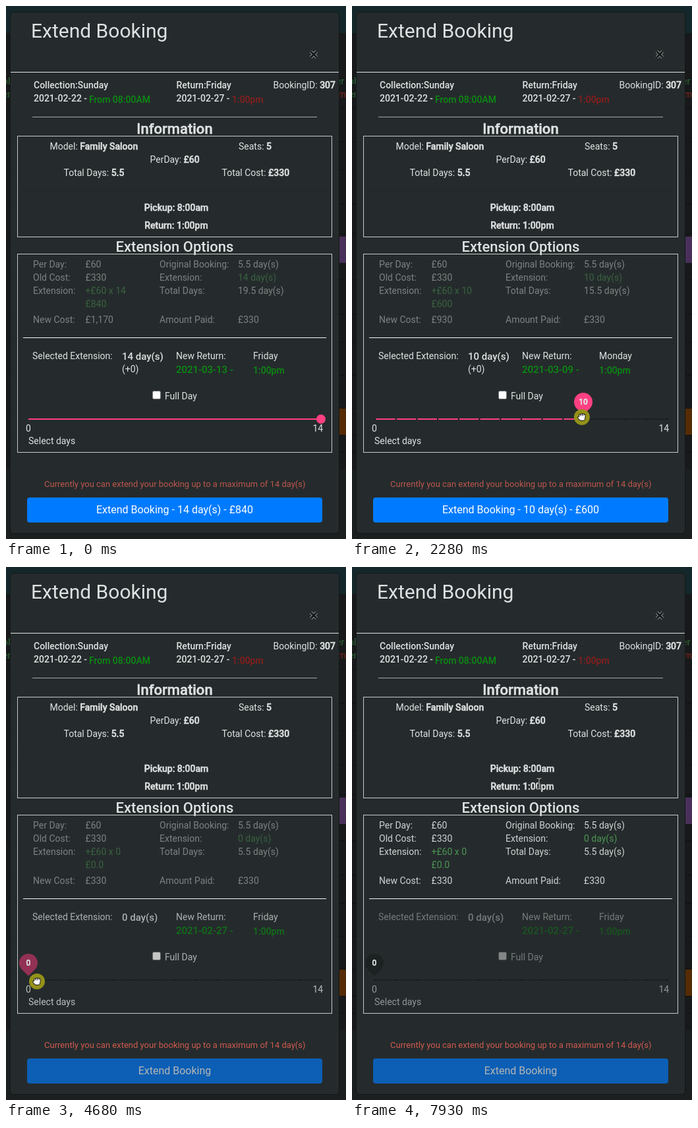
Animation of 516x809 px, one loop 8 s. Source, as an HTML page:

```html
<!DOCTYPE html>
<html lang="en">
<head>
<meta charset="utf-8">
<title>Extend Booking</title>
<style>
  html, body { margin: 0; width: 100%; height: 100%; overflow: hidden; background: #1a1d1e; }
  svg { display: block; width: 516px; height: 809px; font: 14px Roboto, Arial, sans-serif; fill: #dfe1e2; }
  text { white-space: pre; }
  .m { font-weight: 500; }
  .b { font-weight: 500; stroke: #dfe1e2; stroke-width: .5px; }
  .go { fill: #0a8c12; font-weight: 500; }
  .plus { fill: #4f9e57; }
  .mid { text-anchor: middle; }
  .frame { fill: none; stroke: #c6c9c9; }
</style>
</head>
<body>
<svg id="stage" viewBox="0 0 516 809"></svg>
<script>
const LOOP = 8000, PINK = [255, 64, 129], DARK = [28, 33, 34];
const SLIDER = { x: 34, y: 627, step: 31.7, max: 14 };
const WEEK = ['Friday', 'Saturday', 'Sunday', 'Monday', 'Tuesday', 'Wednesday', 'Thursday'];

const text = (x, y, body, cls = '', extra = '') =>
  `<text x="${x}" y="${y}" class="${cls}" ${extra}>${body}</text>`;
const live = (x, y, id, cls = '', extra = '') => text(x, y, '', cls, `id="${id}" ${extra}`);
const rect = (x, y, w, h, fill, extra = '') =>
  `<rect x="${x}" y="${y}" width="${w}" height="${h}" fill="${fill}" ${extra}/>`;
const bold = s => `<tspan class="b">${s}</tspan>`;

const backdrop = () => rect(0, 0, 516, 809, '#17191a') + rect(0, 0, 516, 41, '#14272a') +
  rect(0, 703, 516, 106, '#1b1f20') +
  [155, 206, 248, 300, 345, 415, 467, 510, 560, 610, 651, 677].map(y => rect(0, y, 516, 1, '#0e1011')).join('') +
  rect(500, 350, 20, 40, '#49305a', 'rx="3"') + rect(500, 611, 20, 40, '#552c05') +
  text(-5, 119, 'ol', 'm', 'style="fill:#285a33"') + text(-5, 139, 'er', 'm', 'style="fill:#285a33"') +
  text(501, 119, 'er', 'm', 'style="fill:#285a33"') + text(504, 139, 'm', 'm', 'style="fill:#6b241c"');

const header = () => rect(6.5, 9.5, 499, 791, '#252b2c', 'rx="5" stroke="#141718"') +
  text(38, 48, 'Extend Booking', '', 'font-size="30"') +
  `<path d="M462.5 69l9 9m0-9l-9 9" stroke="#8b8f90" stroke-width="4.6"/>
   <path d="M462.5 69l9 9m0-9l-9 9" stroke="#141718" stroke-width="2.6"/>` +
  rect(7, 100, 498, 1, '#dfe1e2') +
  text(42, 125, 'Collection:Sunday', 'm') + text(42, 145, '2021-02-22 -', 'm') +
  text(126, 147, 'From 08:00AM', 'go') +
  text(258.5, 125, 'Return:Friday', 'm') + text(258.5, 145, '2021-02-27 -', 'm') +
  text(343, 147, '1:00pm', 'm', 'style="fill:#8c1d1d"') +
  text(405.5, 125, 'BookingID: ' + bold('307')) +
  rect(40, 168, 432, 1, '#a3a6a6');

const info = () => text(256, 194, 'Information', 'b mid', 'font-size="22"') +
  rect(17.5, 197.5, 477, 153, 'none', 'class="frame"') +
  text(66.5, 218, 'Model: ' + bold('Family Saloon')) + text(353, 218, 'Seats: ' + bold('5')) +
  text(218.5, 238, 'PerDay: ' + bold('£60')) +
  text(87.5, 258, 'Total Days: ' + bold('5.5')) + text(327.5, 258, 'Total Cost: ' + bold('£330')) +
  rect(26, 280, 460, 1, '#212627') +
  text(258.5, 311, 'Pickup: 8:00am', 'b mid') + text(258.5, 338, 'Return: 1:00pm', 'b mid');

const costs = () => '<g id="costs">' +
  ['Per Day:', 'Old Cost:', 'Extension:'].map((s, i) => text(41, 397 + 20 * i, s)).join('') +
  ['Original Booking:', 'Extension:', 'Total Days:'].map((s, i) => text(233, 397 + 20 * i, s)).join('') +
  text(41, 481, 'New Cost:') + text(233, 481, 'Amount Paid:') +
  text(120.5, 397, '£60') + text(120.5, 417, '£330') + text(352, 397, '5.5 day(s)') + text(352, 481, '£330') +
  live(120.5, 437, 'sum', 'plus') + live(120.5, 457, 'added', 'plus') + live(120.5, 481, 'newCost') +
  live(352, 417, 'extra', 'plus') + live(352, 437, 'total') + '</g>';

const picker = () => '<g id="picker">' +
  text(40, 536, 'Selected Extension:') + live(176, 537, 'chosen', 'm', 'font-size="15"') +
  live(176, 556, 'plusZero') + text(258, 536, 'New Return:') +
  live(258, 557, 'date', 'go', 'font-size="15"') + live(375, 536, 'weekday') + text(375, 558, '1:00pm', 'go') +
  rect(222.5, 584.5, 12, 12, '#fff', 'rx="2" stroke="#777"') + text(241, 597, 'Full Day') + '</g>' +
  '<g id="labels">' + text(30, 646, '0') + text(465.5, 646, '14') + text(34, 665, 'Select days') + '</g>';

const slider = () => rect(34, 626, 444, 2, '#1c2021') + rect(34, 626, 444, 2, '#ff4081', 'id="fill"') +
  '<g id="ticks">' + Array.from({ length: 15 }, (_, i) =>
    rect(SLIDER.x + i * SLIDER.step, 626, 2, 2, '#131718')).join('') + '</g>' +
  '<circle id="thumb" cx="478" cy="627" r="7" fill="#ff4081"/>' +
  '<g id="pin"><path id="drop" d="M0 19.8L-9.9 9.9A14 14 0 1 1 9.9 9.9Z"/>' +
  text(0, 4.3, '', 'b mid', 'id="pinText" font-size="12"') + '</g>';

const footer = () => rect(33, 700, 447, 1, '#222728') +
  text(58, 730, 'Currently you can extend your booking up to a maximum of 14 day(s)', '', 'id="note" font-size="13"') +
  '<g id="button">' + rect(32, 746, 448, 38, '#007bff', 'rx="4"') +
  live(256, 770, 'action', 'mid', 'font-size="16" style="fill:#fff"') + '</g>';

// Strokes drawn twice give a white shape with a dark outline.
const outlined = (d, wide) => [[wide + 1.8, '#111'], [wide, '#fff']].map(([w, c]) =>
  `<path d="${d}" fill="${c}" stroke="${c}" stroke-width="${w}" stroke-linecap="round" stroke-linejoin="round"/>`).join('');
const pointer = () => '<g id="pointer"><circle id="press" r="12" fill="#94911a"/>' +
  '<g id="open">' + outlined('M-3 0L-5 -5M-1 -1L-1.5 -7M2 -1L2 -7.5M4.5 0L6 -5M-4 4L-7 1M-3 0L4.5 0L4 6L-1 7L-4 4Z', 1.9) + '</g>' +
  '<g id="closed">' + outlined('M-3 -1L-3.2 -3M-.5 -2L-.6 -4M2 -2L2 -4M4 -1L4.2 -3M-4 2L-5.2 .5M-3 -1L4 -1L3 4L-2 4L-4 2Z', 1.5) + '</g>' +
  '<g id="arrow"><path d="M0 0V16L3.8 12.5L6.3 18L8.8 17L6.4 11.6H11.5Z" fill="#fff" stroke="#111"/></g>' +
  '<g id="beam"><path d="M-3.5 -8H-1Q0 -8 0 -7Q0 -8 1 -8H3.5M0 -7V7M-3.5 8H-1Q0 8 0 7Q0 8 1 8H3.5" fill="none" stroke="#111" stroke-width="2.6"/>' +
  '<path d="M-3.5 -8H-1Q0 -8 0 -7Q0 -8 1 -8H3.5M0 -7V7M-3.5 8H-1Q0 8 0 7Q0 8 1 8H3.5" fill="none" stroke="#e4e6e6"/></g></g>';

document.getElementById('stage').innerHTML = backdrop() + header() + info() +
  text(256, 373, 'Extension Options', 'm mid', 'font-size="22"') +
  rect(17.5, 376.5, 477, 301, 'none', 'class="frame"') + costs() +
  rect(26, 503, 460, 1, '#f4f5f5') + picker() + slider() + footer() + pointer();

const el = id => document.getElementById(id);
const say = (id, s) => { if (el(id).textContent !== s) el(id).textContent = s; };
const set = (id, name, value) => el(id).setAttribute(name, value);
const show = (id, on) => set(id, 'visibility', on ? 'visible' : 'hidden');
const ramp = (t, a, b) => Math.min(1, Math.max(0, (t - a) / (b - a)));
const mix = (a, b, k) => a + (b - a) * k;

// Pointer way points: time, x, y.
const PATH = [
  [60, 466, 812], [300, 470, 740], [620, 477, 650], [860, 480, 628], [1240, 480, 628],
  [1720, 420, 626], [2280, 349, 624], [3160, 237, 624], [3480, 196, 625], [4360, 83, 628],
  [4480, 49, 629], [4680, 47, 629], [5230, 40, 632], [5600, 85, 718], [5850, 140, 660],
  [6110, 154, 567], [6190, 149, 538], [6270, 149, 537], [6590, 148, 446],
  [7100, 148, 446], [7400, 190, 492], [7850, 284, 329], [8000, 284, 329]
];
function pointerAt(t) {
  const i = Math.max(1, PATH.findIndex(p => p[0] >= t));
  const [a, b] = [PATH[i - 1], PATH[i]];
  const k = ramp(t, a[0], b[0]);
  return [mix(a[1], b[1], k), mix(a[2], b[2], k)];
}

function writeDays(n) {
  const pounds = v => '£' + v.toLocaleString('en-GB');
  const added = n ? pounds(60 * n) : '£0.0';
  say('sum', `+£60 x ${n}`);
  say('added', added);
  say('newCost', pounds(330 + 60 * n));
  say('extra', `${n} day(s)`);
  say('total', `${n + 5.5} day(s)`);
  say('chosen', `${n} day(s)`);
  say('plusZero', n ? '(+0)' : '');
  say('date', new Date(Date.UTC(2021, 1, 27 + n)).toISOString().slice(0, 10) + ' -');
  say('weekday', WEEK[n % 7]);
  say('pinText', String(n));
  say('action', n ? `Extend Booking - ${n} day(s) - ${added}` : 'Extend Booking');
}

function draw(t) {
  const [x, y] = pointerAt(t);
  const pressed = t >= 1000 && t < 5240;
  const dragX = t < 4480 ? x : SLIDER.x;
  const n = t < 1000 ? SLIDER.max : Math.min(SLIDER.max, Math.max(0, Math.round((dragX - SLIDER.x) / SLIDER.step)));
  const thumbX = SLIDER.x + n * SLIDER.step;
  const off = ramp(t, 4480, 4900);
  writeDays(n);

  set('costs', 'opacity', mix(.47, .92, ramp(t, 6300, 6750)));
  set('picker', 'opacity', mix(1, .43, off));
  set('labels', 'opacity', mix(1, .58, off));
  set('button', 'opacity', n ? 1 : .65);
  set('note', 'style', `fill:${n ? '#bd564d' : '#cf5b50'}`);

  set('fill', 'width', thumbX - SLIDER.x);
  show('ticks', t >= 620);
  show('thumb', !pressed && t < 1000);
  show('pin', t >= 1000);
  set('pin', 'transform', `translate(${thumbX} 601)`);
  set('drop', 'fill', `rgb(${PINK.map((c, i) => Math.round(mix(c, DARK[i], off)))})`);

  const onSlider = t >= 620 && t < 1000;
  const beam = t >= 6000;
  set('pointer', 'transform', `translate(${x} ${y})`);
  show('press', pressed);
  show('open', onSlider);
  show('closed', pressed);
  show('arrow', (t >= 70 && t < 620) || (t >= 5240 && !beam));
  show('beam', beam);
}

const start = performance.now();
function tick() {
  draw((performance.now() - start) % LOOP);
  requestAnimationFrame(tick);
}
tick();
</script>
</body>
</html>
```
